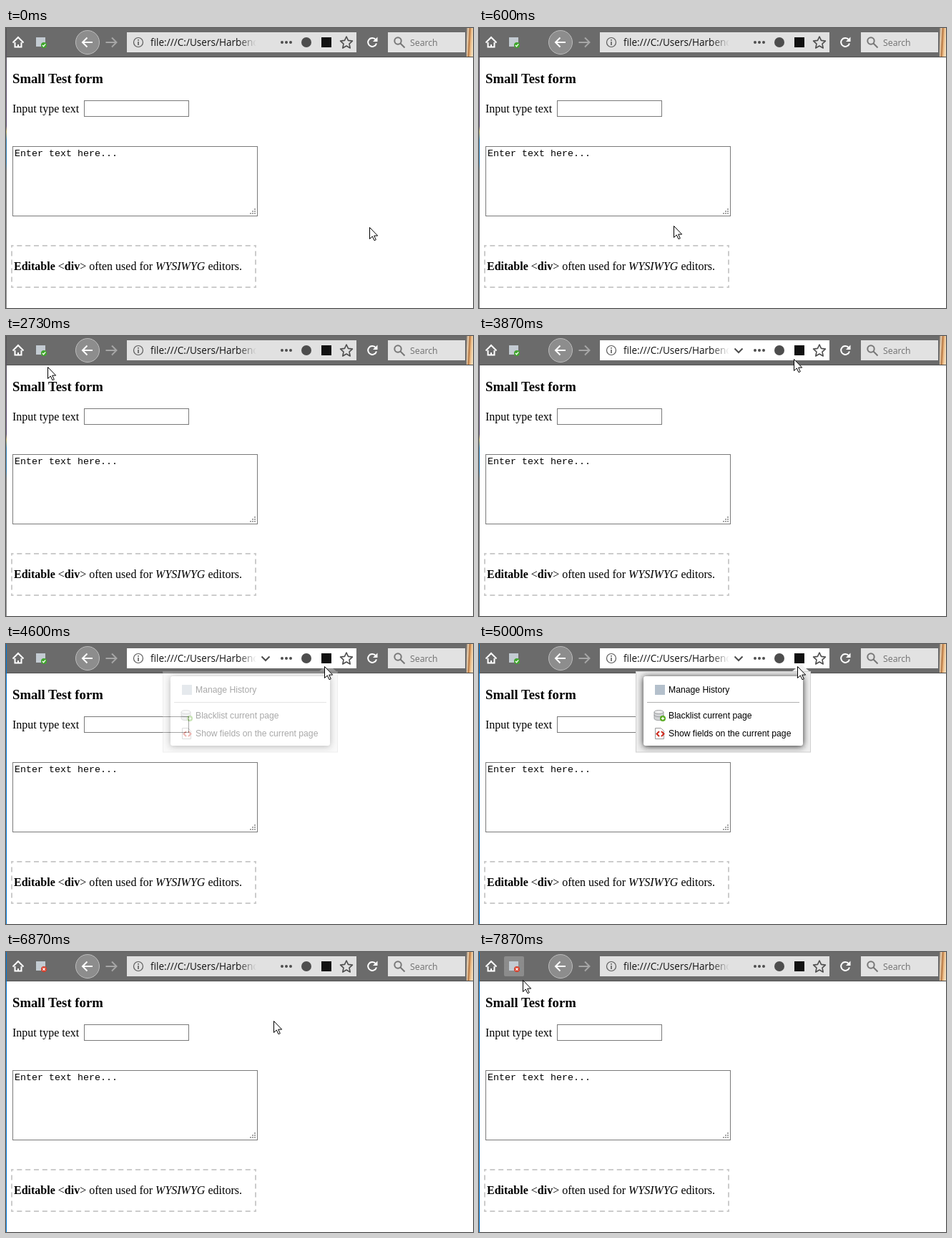
Recreate the animation shown at these times as an HTML page. Size 653 px wide and 391 px high, loop 8000 ms.

```html
<!DOCTYPE html>
<html lang="en">
<head>
<meta charset="utf-8">
<title>Small Test form</title>
<style>
  html, body { margin: 0; width: 100%; height: 100%; overflow: hidden; background: #fff; }
  svg { display: block; width: 653px; height: 391px; }
  text { white-space: pre; }
  .page { font: 16px "Liberation Serif", serif; }
  .ui { font: 13.6px "Open Sans", "Noto Sans", sans-serif; }
  .menu { font: 12.2px "Liberation Sans", sans-serif; }
  .line { fill: none; stroke-width: 2; }
  .thin { fill: none; stroke: #fff; stroke-width: 1.3; }
  .field { fill: #fff; stroke: #7a7a7a; }
  .field.hover { stroke: #171717; }
  #editable { stroke: #ccc; stroke-width: 2; }
  #editable.hover { stroke: #999; }
  #urlBar { fill: #e1e1e1; }
  #urlBar.hover { fill: #fff; }
</style>
</head>
<body>
<svg viewBox="0 0 653 391">
  <defs>
    <pattern id="stripes" width="4" height="2" patternUnits="userSpaceOnUse">
      <rect width="4" height="2" fill="#727272"/><rect width="4" height="1" fill="#646464"/>
    </pattern>
    <linearGradient id="urlFade" gradientUnits="userSpaceOnUse" x1="325" x2="350">
      <stop offset="0" stop-color="#111"/><stop offset="1" stop-color="#111" stop-opacity="0"/>
    </linearGradient>
    <linearGradient id="themeEdge" x2="1" y2=".25">
      <stop offset="0" stop-color="#8a7a6c"/><stop offset=".25" stop-color="#ead3b4"/>
      <stop offset=".5" stop-color="#b4743f"/><stop offset=".7" stop-color="#e9b57e"/><stop offset="1" stop-color="#f3dcb8"/>
    </linearGradient>
    <linearGradient id="desktop" x2="0" y2="1">
      <stop offset="0" stop-color="#555"/><stop offset=".28" stop-color="#5b4a70"/>
      <stop offset=".35" stop-color="#5b4a70"/><stop offset=".37" stop-color="#b5a35a"/>
      <stop offset=".4" stop-color="#2f7fb5"/><stop offset=".48" stop-color="#2f7fb5"/>
      <stop offset=".51" stop-color="#777"/><stop offset="1" stop-color="#8a8a8a"/>
    </linearGradient>
    <filter id="shadow" x="-20%" y="-20%" width="140%" height="140%"><feGaussianBlur stdDeviation="5"/></filter>
    <clipPath id="popupClip"><rect x="220" y="39" width="243" height="112"/></clipPath>
  </defs>

  <rect width="653" height="391" fill="#fff"/>

  <g class="page">
    <text x="9" y="77" font-size="18.72" font-weight="bold">Small Test form</text>
    <text x="9" y="118">Input type text</text>
    <rect id="input" class="field" x="109.5" y="101.5" width="146" height="22"/>
    <rect id="textarea" class="field" x="9.5" y="165.5" width="342" height="97"/>
    <text x="12" y="179" font-family="'Liberation Mono', monospace" font-size="13.333">Enter text here...</text>
    <path d="M347 253h2M344 256h2m1 0h2M341 259h2m1 0h2m1 0h2" stroke="#a5a5a5" stroke-width="2"/>
    <g id="editable">
      <path d="M7 304H350M7 362H350" stroke-dasharray="7 4.83" stroke-dashoffset="3.5"/>
      <path d="M8 303V363M349 303V363" stroke-dasharray="7 5" stroke-dashoffset="3.5"/>
    </g>
    <text x="11" y="338"><tspan font-weight="bold">Editable </tspan>&lt;<tspan font-weight="bold">div</tspan>&gt; often used for <tspan font-style="italic">WYSIWYG</tspan> editors.</text>
  </g>

  <g id="toolbar">
    <rect width="653" height="40" fill="url(#stripes)"/>
    <rect x="644" width="9" height="40" fill="url(#themeEdge)"/>
    <path d="M0 40.5H653" stroke="#4a4a4a"/>
    <path d="M9.5 20.500 17 13l7.500 7.500M12.500 20v6.500h9V20M17 27v-4" class="line" stroke="#fff"/>
    <rect id="buttonHover" x="35" y="6" width="28" height="28" rx="2" fill="#fff" fill-opacity=".22"/>
    <rect x="42" y="13" width="13" height="13" fill="#c3cbd2"/>
    <g id="allowed"><circle cx="53" cy="24" r="4" fill="#3fa52c"/><path d="M51 24l1.500 1.700 2.700-3.300" class="thin"/></g>
    <g id="blocked"><circle cx="53" cy="24" r="4" fill="#d8402c"/><path d="M51.400 22.400l3.200 3.200m0-3.200-3.200 3.200" class="thin"/></g>
    <circle cx="114" cy="20" r="16.5" fill="#8d8d8d" stroke="#bcbcbc"/>
    <path d="M121 20H107.500M113.500 13.500 107 20l6.500 6.500" class="line" stroke="#fff"/>
    <path d="M139.500 20H154M148 13.500l6.500 6.500-6.500 6.500" class="line" stroke="#a6a6a6"/>

    <rect id="urlBar" x="169" y="6" width="321" height="28"/>
    <circle cx="185" cy="20" r="6.5" fill="none" stroke="#5a5a5a" stroke-width="1.2"/>
    <path d="M185 16v1.700M185 19v5" stroke="#5a5a5a" stroke-width="1.6"/>
    <text class="ui" x="202" y="25" fill="url(#urlFade)">file:///C:/Users/Harbeno</text>
    <path id="chevron" d="M357.500 17.500l5.500 5.500 5.500-5.500" class="line" stroke="#4d4d4d"/>
    <path d="M386 20h0m6 0h0m6 0h0" stroke="#4d4d4d" stroke-width="4" stroke-linecap="round"/>
    <circle cx="420" cy="20" r="7" fill="#4d4d4d"/>
    <rect x="441" y="13" width="14" height="14" fill="#111"/>
    <path d="M476 12l2.500 5.400 5.900.700-4.400 4 1.200 5.900-5.200-3-5.200 3 1.200-5.900-4.400-4 5.900-.700Z" fill="none" stroke="#4d4d4d" stroke-width="1.600" stroke-linejoin="round"/>
    <path d="M517 16.300A6 6 0 1 0 518 21.500" class="line" stroke="#fff"/>
    <path d="M519.500 12.500V19H513Z" fill="#fff"/>
    <rect x="534" y="6" width="108" height="28" fill="#e2e2e2"/>
    <circle cx="548" cy="18" r="4.700" class="line" stroke="#777"/>
    <path d="M551.500 21.500l6 6" class="line" stroke="#777"/>
    <text class="ui" x="565" y="25" style="font-size:12.300px" fill="#707070">Search</text>
  </g>
  <rect id="windowEdge" width="1" height="391"/>

  <g id="popup">
    <path d="M437 39 450 28 463 39Z" fill="#f2f2f2"/>
    <rect x="219.5" y="38.5" width="244" height="112.500" fill="#f0f0f0" stroke="#cfcfcf"/>
    <rect x="230" y="46" width="223" height="97" fill="#222" filter="url(#shadow)" clip-path="url(#popupClip)"/>
    <rect x="230" y="45" width="223" height="97" rx="3" fill="#fff"/>
    <rect id="rowHover" x="230" width="223" height="25" fill="#09095c"/>
    <path d="M235 81.500H448" stroke="#b0b0b0"/>
    <rect x="246" y="57" width="14" height="14" fill="#b4c0cc"/>
    <path d="M245 95v9c0 3.500 13 3.500 13 0v-9" fill="#d2d4d6" stroke="#8b8d90" stroke-width=".8"/>
    <ellipse cx="251.500" cy="95" rx="6.500" ry="2.500" fill="#eee" stroke="#8b8d90" stroke-width=".8"/>
    <path d="M245 99c0 3.500 13 3.500 13 0" fill="none" stroke="#8b8d90" stroke-width=".8"/>
    <circle cx="257" cy="104" r="4" fill="#55aa1c"/><path d="M254.800 104h4.400m-2.200-2.200v4.400" class="thin"/>
    <path d="M246.500 117.500h8l4 4v11h-12Z" fill="#fff" stroke="#999"/>
    <path d="M252 122l-3.500 3.500 3.500 3.500m3-7 3.500 3.500-3.500 3.500" class="line" stroke="#cc2a1e"/>
    <g class="menu">
      <text x="265" y="68">Manage History</text>
      <text x="265" y="104">Blacklist current page</text>
      <text x="265" y="129">Show fields on the current page</text>
    </g>
  </g>

  <g id="cursor">
    <path id="arrow" d="M.5.500V16.500L4.300 13 7 18.700 9.300 17.700 6.700 12.100H11.700Z" fill="#fff" stroke="#000"/>
    <path id="beam" d="M-3 -8.500H-1L.5-7.500 2-8.500H4M.5-7.500V7.500M-3 8.500H-1L.5 7.500 2 8.500H4" fill="none" stroke="#000"/>
  </g>
</svg>
<script>
const LOOP = 8000, STEP = 200 / 3;
const POPUP_OPEN = 4600, POPUP_CLOSE = 6270, PAGE_BLOCKED = 6330, WINDOW_ACTIVE = 4330;

// Pointer path: time, x, y
const path = [
  [0, 508, 278], [400, 300, 325], [870, 235, 210], [1000, 235, 210],
  [1330, 180, 150], [1870, 81, 39], [2130, 48, 28], [2400, 33, 36],
  [2730, 58, 43], [2865, 58, 43], [3330, 240, 49], [3730, 428, 39],
  [3870, 440, 32], [4130, 445, 31], [5000, 445, 31], [5400, 428, 58],
  [5800, 400, 100], [6800, 400, 100], [7270, 225, 72], [7670, 64, 44],
  [7730, 61, 42], [7800, 61, 42], [7870, 61, 39], [LOOP, 61, 39]
];
const zones = {
  input: [109, 101, 256, 124],
  textarea: [9, 165, 352, 263],
  editable: [7, 303, 350, 363],
  urlBar: [169, 0, 490, 38]
};
const rows = [51, 87, 112];
const get = id => document.getElementById(id);
const show = (id, on) => get(id).style.display = on ? "" : "none";
const within = ([x, y], [left, top, right, bottom]) =>
  x >= left && x < right && y >= top && y < bottom;
const labels = document.querySelectorAll(".menu text");

function pointerAt(t) {
  const i = Math.max(1, path.findIndex(p => p[0] >= t));
  const [t0, x0, y0] = path[i - 1], [t1, x1, y1] = path[i];
  const k = (t - t0) / (t1 - t0);
  return [Math.round(x0 + (x1 - x0) * k), Math.round(y0 + (y1 - y0) * k)];
}

function draw(time) {
  // The picture advances in whole steps, rounded to 10 ms.
  const t = Math.min(LOOP, Math.round(Math.floor((time % LOOP + 5) / STEP) * STEP / 10) * 10);
  const pos = pointerAt(t);
  const hover = {};
  for (const id in zones) {
    hover[id] = within(pos, zones[id]);
    get(id).classList.toggle("hover", hover[id]);
  }
  const typing = hover.input || hover.textarea || hover.editable;
  get("cursor").setAttribute("transform", `translate(${pos})`);
  show("arrow", !typing);
  show("beam", typing);
  show("chevron", hover.urlBar);
  show("buttonHover", within(pos, [35, 0, 63, 40]));
  show("allowed", t < PAGE_BLOCKED);
  show("blocked", t >= PAGE_BLOCKED);
  get("windowEdge").setAttribute("fill", t < WINDOW_ACTIVE ? "url(#desktop)" : "#0078d7");

  show("popup", t >= POPUP_OPEN && t < POPUP_CLOSE);
  get("popup").setAttribute("opacity", Math.max(0, Math.min(1, (t - POPUP_OPEN + STEP) / 200)));
  const active = rows.findIndex(y => within(pos, [230, y, 453, y + 25]));
  show("rowHover", active >= 0);
  if (active >= 0) get("rowHover").setAttribute("y", rows[active]);
  labels.forEach((label, i) => label.setAttribute("fill", i === active ? "#fff" : "#000"));
}

const start = performance.now();
(function tick() {
  draw(performance.now() - start);
  requestAnimationFrame(tick);
})();
</script>
</body>
</html>
```
